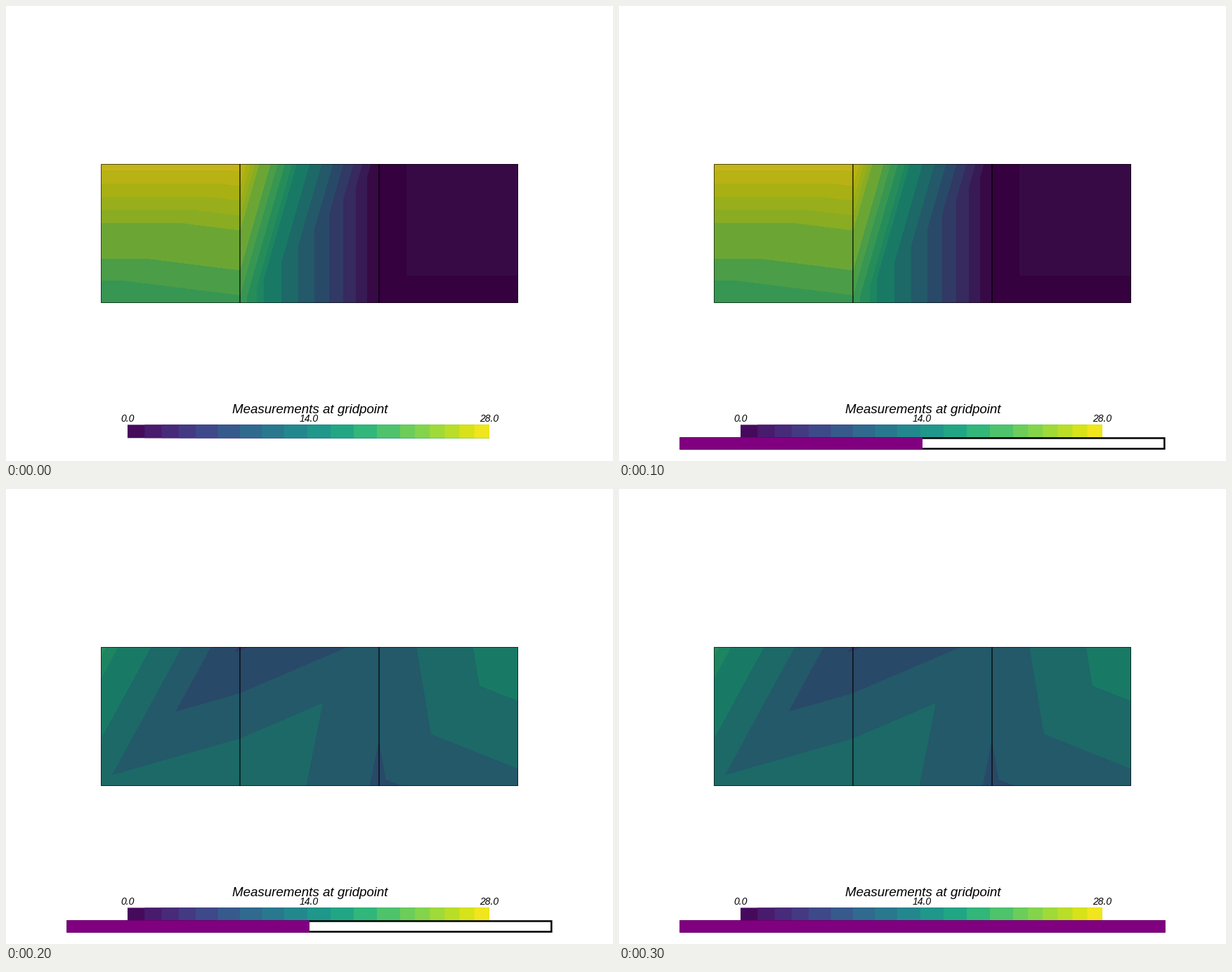
Write a matplotlib script that moves like this. It is 864x648 px and loops after 0.4 s.

```python
import numpy as np
import matplotlib.pyplot as plt
from matplotlib.animation import FuncAnimation
from matplotlib.patches import Rectangle
from matplotlib.tri import Triangulation

W, H, DPI = 864, 648, 100
PT = 72 / DPI
TOP_VALUE = 28
viridis = plt.get_cmap("viridis")

fig = plt.figure(figsize=(W / DPI, H / DPI), dpi=DPI, facecolor="white")
ax = fig.add_axes([0, 0, 1, 1])


def rect(x0, y0, x1, y1, color, z):
    return ax.add_patch(Rectangle((x0, y0), x1 - x0, y1 - y0, facecolor=color,
                                  edgecolor="none", snap=False, zorder=z))


def label(x, y, text, size):
    ax.text(x, y, text, fontsize=size * PT, family="Liberation Sans",
            style="italic", ha="center", va="baseline", color="black", zorder=6)


# Three cells, each split along its rising diagonal
LEFT, RIGHT, TOP, BOTTOM = 135, 729, 225, 423
xs = np.linspace(LEFT, RIGHT, 4)
cells = [t for i in range(3)
         for t in ([i, i + 1, i + 4], [i + 4, i + 1, i + 5])]
mesh = Triangulation(np.tile(xs, 2), np.repeat([TOP, BOTTOM], 4), cells)

# Scalar at each grid point: top row, then bottom row
READINGS = [
    [28, 28, 0, 1, 19, 20, 0, 0],
    [18, 7, 10, 16, 12, 14, 9, 11],
]

# Colour bands widen towards the middle of the range, then narrow
k = np.arange(9)
levels = np.concatenate([[0], 0.2 + 1.45 * k + 0.076 * k**2,
                         np.linspace(17.6, 21.9, 4),
                         np.linspace(24.2, 27.6, 5), [TOP_VALUE]])
LIGHT = [0.78, 0.78, 0.735]
middles = (levels[:-1] + levels[1:]) / 2
shades = viridis(middles / TOP_VALUE)[:, :3] * LIGHT
levels[0] -= 1
levels[-1] += 1

fields = [ax.tricontourf(mesh, values, levels=levels, colors=shades, zorder=1)
          for values in READINGS]

ax.add_patch(Rectangle((LEFT + .5, TOP + .5), RIGHT - LEFT - 1,
                       BOTTOM - TOP - 1, fill=False, edgecolor="black",
                       alpha=.6, lw=PT, snap=False, zorder=3))
for x in xs[1:3]:
    ax.plot([x, x], [TOP, BOTTOM], color="black", lw=1.2 * PT, snap=False,
            solid_capstyle="butt", zorder=3)

# Colour bar: each band is painted over the rest of the bar
BAR_LEFT, BAR_RIGHT = 173, 687.7
edges = np.interp(np.arange(20), [0, 4, 8, 13, 19],
                  [BAR_LEFT, 270, 396, 561, BAR_RIGHT])
for x0, x1 in zip(edges, edges[1:]):
    share = ((x0 + x1) / 2 - BAR_LEFT) / (BAR_RIGHT - BAR_LEFT)
    rect(x0, 596.4, BAR_RIGHT, 615.3, viridis(share), 4)
label(432.5, 579.5, "Measurements at gridpoint", 18.75)
for value in (0, TOP_VALUE / 2, TOP_VALUE):
    x = np.interp(value, [0, TOP_VALUE], [173.5, 688])
    label(x, 591.5, f"{value:.1f}", 14)

# Progress bar
P0, P1, PY0, PY1 = 0.1 * W, 0.9 * W, 614.2, 631.8
progress = [rect(P0, PY0, P1, PY1, "black", 7),
            rect(P0 + 2.5, PY0 + 2.5, P1 - 2.5, PY1 - 2.5, "white", 8),
            rect(P0, PY0, P0, PY1, "purple", 9)]

ax.set_xlim(0, W)
ax.set_ylim(H, 0)
ax.axis("off")


def draw(n):
    for i, field in enumerate(fields):
        field.set_visible(i == n // 2)
    # The bar moves on in halves, one step before each new reading
    done = (n + 1) // 2 / 2
    for part in progress:
        part.set_visible(done > 0)
    progress[-1].set_width(done * (P1 - P0))
    return []


anim = FuncAnimation(fig, draw, frames=4, interval=100, repeat=True,
                     repeat_delay=0, blit=False)
plt.show()
```
